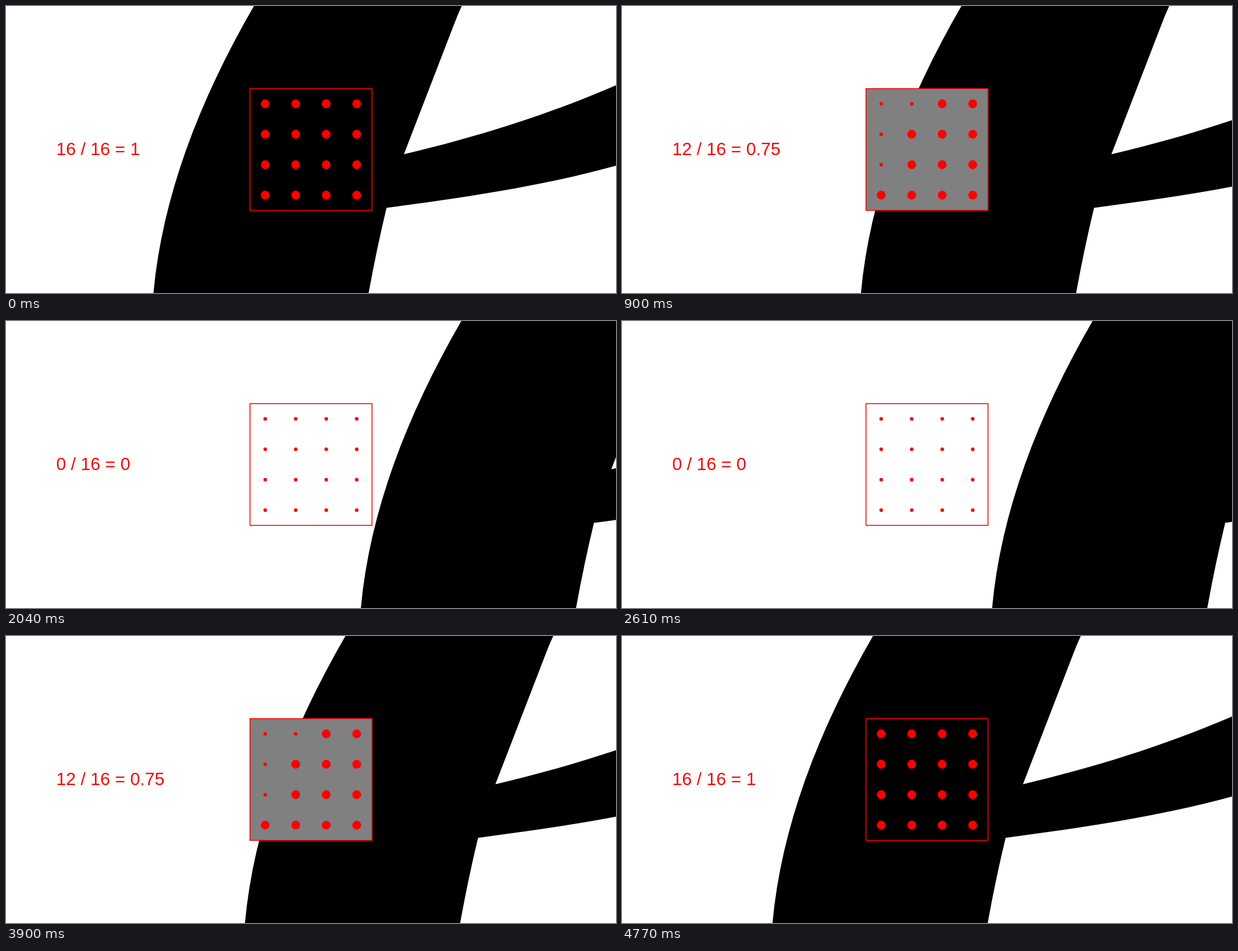
Recreate the animation shown at these times as an HTML page with a canvas. Size 1090x514 px, loop 4.8 s.

```html
<!DOCTYPE html>
<html lang="en">
<head>
<meta charset="utf-8">
<title>Pixel coverage sampling</title>
<style>
html, body { margin: 0; width: 100%; height: 100%; overflow: hidden; background: #fff; }
canvas { display: block; }
</style>
</head>
<body>
<canvas id="stage" width="1090" height="514"></canvas>
<script>
const ctx = document.getElementById('stage').getContext('2d');
const RED = '#f00';
const LOOP = 4800, STEP = 30;
const BOX = 218, LEFT = 436, TOP = 148;
const GRID = 4, CELL = BOX / GRID;

// Enlarged glyph outline at its leftmost position
const glyph = new Path2D(`M443 0 C344.3 171.3 279.2 342.7 263.5 514 V520 H647 L648 514
  Q662.5 434 680 361.5 C816.7 343 953.3 323.8 1090 286 L1100 283 V138 L1090 142
  C963.7 196.7 837.3 235.6 711 265.5 L799 37 Q806 18 814.3 0 Z`);

const samples = Array.from({ length: GRID * GRID }, (_, i) => ({
  x: LEFT + (i % GRID + 0.5) * CELL,
  y: TOP + (Math.floor(i / GRID) + 0.5) * CELL
}));

function dot(x, y, radius) {
  ctx.beginPath();
  ctx.arc(x, y, radius, 0, 2 * Math.PI);
  ctx.fill();
}

function draw(time) {
  const t = Math.floor((time % LOOP) / STEP + 0.001) * STEP;
  const shift = 2 * BOX * (1 - Math.abs(1 - 2 * t / LOOP));
  const hits = samples.map(p => ctx.isPointInPath(glyph, p.x - shift, p.y));
  const count = hits.filter(Boolean).length;
  const coverage = count / samples.length;

  ctx.fillStyle = '#fff';
  ctx.fillRect(0, 0, 1090, 514);
  ctx.save();
  ctx.translate(shift, 0);
  ctx.fillStyle = '#000';
  ctx.fill(glyph);
  ctx.restore();

  // Gamma 2 turns coverage into a grey level
  const grey = Math.round(255 * Math.sqrt(1 - coverage));
  ctx.fillStyle = `rgb(${grey},${grey},${grey})`;
  ctx.fillRect(LEFT, TOP, BOX, BOX);
  ctx.strokeStyle = RED;
  ctx.lineWidth = 1.6;
  ctx.strokeRect(LEFT, TOP, BOX, BOX);

  ctx.fillStyle = RED;
  samples.forEach((p, i) => dot(p.x, p.y, hits[i] ? 7.9 : 3.2));
  ctx.font = '31.5px "Liberation Sans", Helvetica, Arial, sans-serif';
  ctx.fillText(`${count} / ${samples.length} = ${coverage}`, 89.7, 267);
}

let start;
function tick(now) {
  start ??= now;
  draw(now - start);
  requestAnimationFrame(tick);
}
draw(0);
requestAnimationFrame(tick);
</script>
</body>
</html>
```
